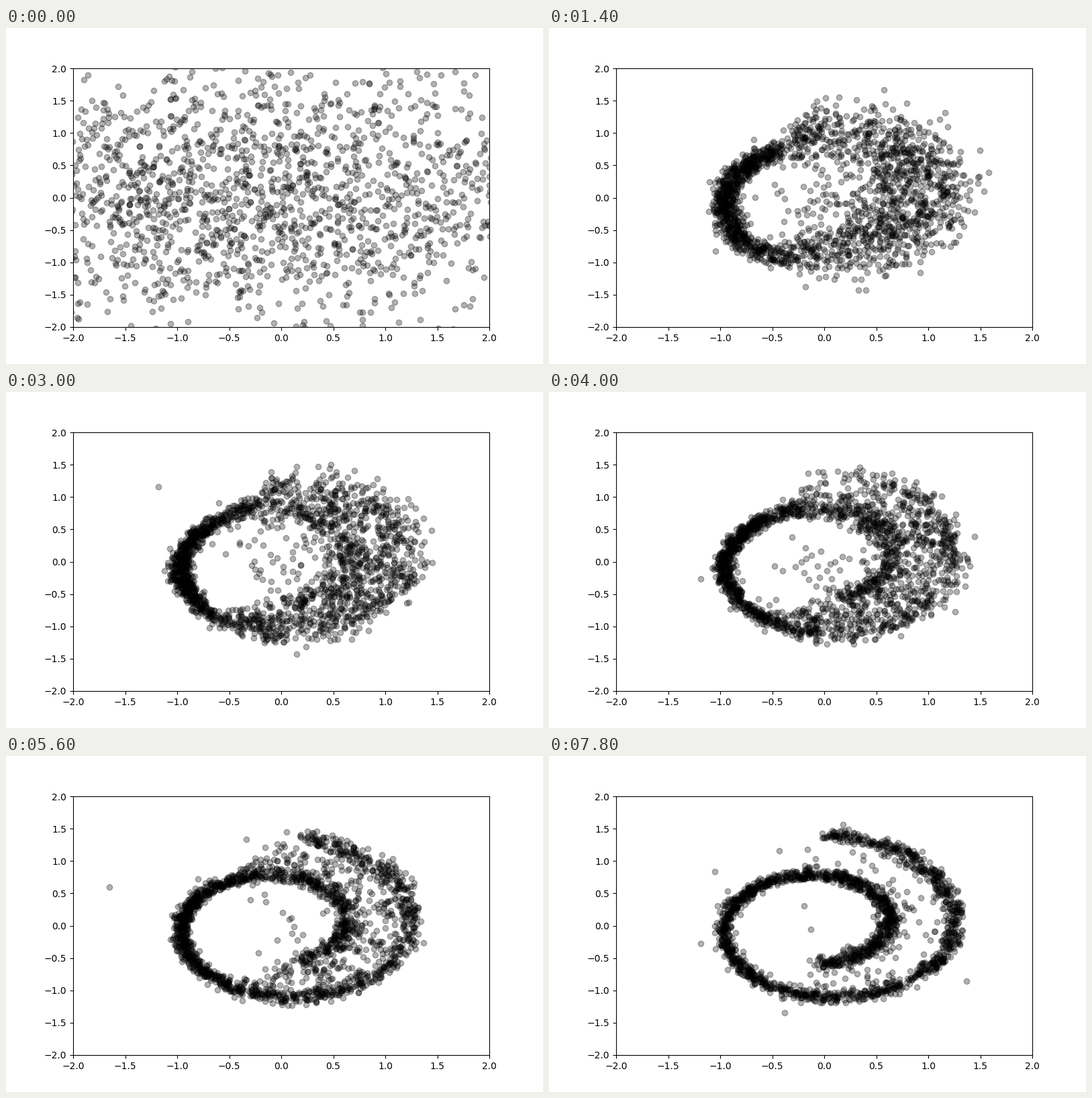
Recreate the animation shown at these times as a matplotlib script. Size 800 by 500 pixels, loop 8 s.

```python
import numpy as np
import matplotlib.pyplot as plt
from matplotlib.animation import FuncAnimation

FRAMES, STEP_MS, N = 40, 200, 2000
SETTLED = 7            # steps until the loose cloud has become a ring
PI = np.pi
INNER, LEFT, OUTER = 1.5 * PI, 3 * PI, 4.5 * PI


def roll(t):
    """Spiral arm at angle t; its inner end droops slightly."""
    droop = .04 * np.clip(2 * PI - t, 0, None) ** 2
    return np.column_stack([t * np.cos(t), t * np.sin(t) - 10 * droop]) / 10


def wide_cloud(rng):
    pts = rng.normal((-.1, .12), (1.7, 1.15), (N, 2))
    k = N // 10
    pts[:k] = rng.normal((-1, -.2), .65, (k, 2))
    return pts


def sample_angles(rest, rng):
    low = INNER + .6 * rest ** .5 - .12
    high = OUTER - .3 * rest ** .5
    t = low + (high - low) * rng.random(N) ** .88
    crowd = rng.random(N) < .24 * rest ** .7
    t[crowd] = np.clip(rng.normal(LEFT, .75, crowd.sum()), 2.4 * PI, 3.6 * PI)
    return t


def smear(t, share, rng):
    """Pull points part of the way to the neighbouring turn of the spiral."""
    partner = np.clip(np.where(t < LEFT, t + 2 * PI, t - 2 * PI), INNER, OUTER)
    side = np.clip(1 - (PI / 2 - np.abs(t - LEFT)) / .7, 0, 1)
    mix = rng.random(N) * side * (rng.random(N) < share)
    return roll(t) + mix[:, None] * (roll(partner) - roll(t)), side


def strays(done, rng):
    far = rng.normal(0, .65 + .35 * done, (10, 2))
    return far[(np.abs(far[:, 0]) < 1.8) & (far[:, 1] > -1.5)]


def cloud(i):
    rng = np.random.default_rng(100 + i)
    done = max(0, (i - SETTLED) / (FRAMES - 1 - SETTLED))
    rest = 1 - done

    t = sample_angles(rest, rng)
    pts, side = smear(t, .07 + .8 * rest ** 1.3, rng)
    thin = .042 + .025 * rest ** 3
    wide = .05 + .11 * rest ** 2.5
    pts += rng.normal(0, 1, (N, 2)) * (thin + (wide - thin) * side)[:, None]
    pts[:, 0] += rng.normal(0, .015)

    # a few points still inside the hollow
    hollow = rng.random(N) < .002 + .045 * rest ** 2
    pts[hollow] = rng.normal((.1, -.05), (.3, .35), (hollow.sum(), 2))

    loose = np.exp(-i / 1.5) if i < SETTLED else 0
    pts = loose * wide_cloud(rng) + (1 - loose) * pts
    return np.vstack([pts, strays(done, rng)])


fig, ax = plt.subplots(figsize=(8, 5), dpi=100)
ax.set_xlim(-2, 2)
ax.set_ylim(-2, 2)
dots = ax.scatter([], [], s=36, c="black", alpha=.3)


def draw(i):
    dots.set_offsets(cloud(i))
    return dots,


anim = FuncAnimation(fig, draw, frames=FRAMES, interval=STEP_MS,
                     repeat=True, repeat_delay=0, blit=False)
plt.show()
```
